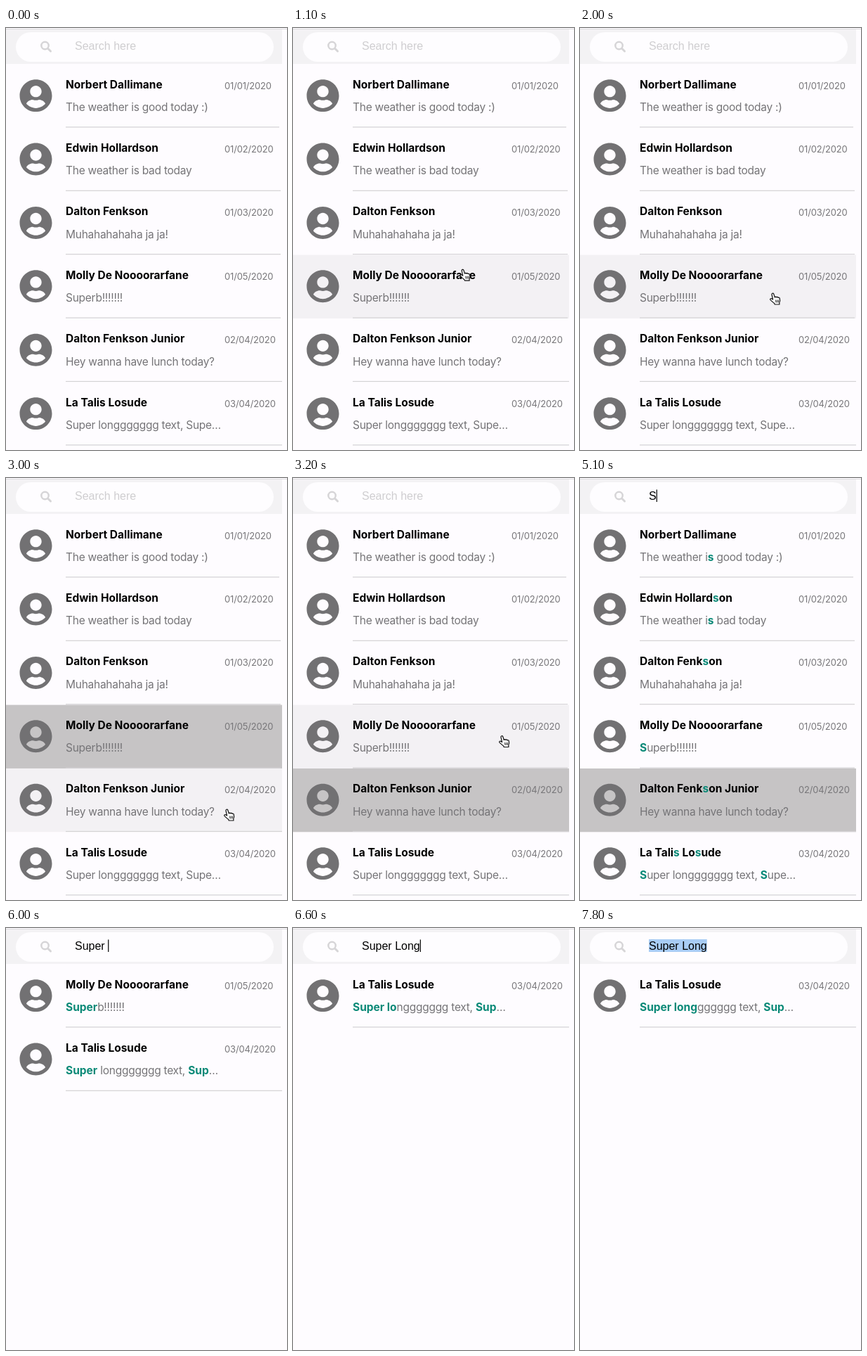
An HTML page that plays this animation: 400 px wide and 600 px high, repeating every 8000 ms.

```html
<!DOCTYPE html>
<html lang="en">
<head>
<meta charset="utf-8">
<title>Message search</title>
<style>
  html, body { margin: 0; width: 100%; height: 100%; overflow: hidden; background: #fefcff; }
  svg { display: block; width: 400px; height: 600px; }
  text { white-space: pre; font-family: Inter, Roboto, sans-serif; }
  .name { font-size: 15.5px; font-weight: 700; letter-spacing: 0; fill: #000; }
  .body { font-size: 15.5px; letter-spacing: -.26px; fill: #757477; }
  .date { font-size: 13px; letter-spacing: -.17px; fill: #78777a; }
  .hit { font-weight: 700; letter-spacing: 0; fill: #0a8977; }
  .input { font: 16px "Liberation Sans", Arial, sans-serif; fill: #000; }
  .hint { fill: #cfced0; }
</style>
</head>
<body>
<svg viewBox="0 0 400 600">
  <defs>
    <path id="avatar" fill="#727173" fill-rule="evenodd" d="M248 8C111 8 0 119 0 256s111 248 248 248 248-111 248-248S385 8 248 8zm0 96c48.600 0 88 39.400 88 88s-39.400 88-88 88-88-39.400-88-88 39.400-88 88-88zm0 344c-58.700 0-111.300-26.600-146.500-68.200 18.800-35.400 55.600-59.800 98.500-59.800 2.400 0 4.800.4 7.100 1.100 13 4.200 26.600 6.900 40.900 6.900 14.300 0 28-2.700 40.900-6.900 2.300-.7 4.700-1.100 7.100-1.100 42.900 0 79.700 24.400 98.500 59.800C359.300 421.400 306.700 448 248 448z"/>
  </defs>
  <rect width="400" height="600" fill="#fefcff"/>
  <rect y="1" width="393" height="50" fill="#f3f2f4"/>
  <rect y="1" width="400" height="1" fill="#dcdbdd"/>
  <rect x="14" y="6" width="367" height="42" rx="21" fill="#fefdff"/>
  <g fill="none" stroke="#d6d5d7" stroke-width="2.5">
    <circle cx="55.500" cy="25" r="5.200"/>
    <path d="M59.500 29l4 4" stroke-width="3" stroke-linecap="round"/>
  </g>
  <rect id="selection" x="98" y="16" height="18" fill="#a9cdf5"/>
  <text id="hint" class="input hint" x="98" y="31">Search here</text>
  <text id="input" class="input" x="98" y="31"></text>
  <rect id="caret" y="16.500" width="1.200" height="17.500" fill="#000"/>
  <g id="list"></g>
  <g id="hand" stroke="#111" stroke-linejoin="round" stroke-linecap="round">
    <path fill="#fff" stroke-width="1.200" d="M3 3C2.600 1.200 5 .4 5.700 2L7.300 7C7.600 6 9.200 5.900 9.600 7C10.200 6.100 11.700 6.300 12 7.500C12.800 6.800 14 7.300 14.300 8.500C14.800 10.500 15.200 12.500 13.800 14.500L13.900 17H7.200L6.800 15.600C5 14.400 3.200 12.400 1 10.600C0 9.400 1.600 8 3 8.900L4.600 10Z"/>
    <path fill="none" stroke-width=".9" d="M8.500 11l.5 3M10.500 11l.4 3M12.400 10.800l.3 3"/>
  </g>
  <g id="beam" fill="none">
    <path id="beamShape" d="M-3.500-8Q-1-8 0-6Q1-8 3.500-8M0-6V6M-3.500 8Q-1 8 0 6Q1 8 3.500 8M-2 2.500H2" stroke="#fff" stroke-width="2.600"/>
    <path d="M-3.500-8Q-1-8 0-6Q1-8 3.500-8M0-6V6M-3.500 8Q-1 8 0 6Q1 8 3.500 8M-2 2.500H2" stroke="#111" stroke-width="1.200"/>
  </g>
</svg>
<script>
const LOOP = 8000, TICK = 100, TOP = 51, PITCH = 90.4;
const $ = id => document.getElementById(id);

const rows = [
  ["Norbert Dallimane", "The weather is good today :)", "01/01/2020", 389],
  ["Edwin Hollardson", "The weather is bad today", "01/02/2020", 391],
  ["Dalton Fenkson", "Muhahahahaha ja ja!", "01/03/2020", 391],
  ["Molly De Noooorarfane", "Superb!!!!!!!", "01/05/2020", 391],
  ["Dalton Fenkson Junior", "Hey wanna have lunch today?", "02/04/2020", 393],
  ["La Talis Losude", "Super longgggggg text, Super longgggggg text", "03/04/2020", 393]
].map(([name, body, date, end], id) => ({ id, name, body, date, end }));

// Stepped tracks: [start time, value]
const typed = [[0, ""], [5000, "S"], [5200, "Su"], [5300, "Sup"], [5400, "Supe"], [5500, "Super"],
  [6000, "Super "], [6300, "Super L"], [6400, "Super Lo"], [6500, "Super Lon"], [6600, "Super Long"]];
const queries = [[0, ""], [5100, "s"], [5300, "su"], [5500, "sup"], [5600, "supe"], [5800, "super"],
  [6400, "super l"], [6600, "super lo"], [6700, "super lon"], [6800, "super long"]];
const selected = [[0, -1], [2300, 3], [3200, 4]];
const caretOn = [[0, false], [4400, true], [4800, false], [5000, true], [7100, false], [7600, true], [7800, false]];

// Pointer hotspot: [time, x, y]
const pointer = [[500, 201, 111], [600, 203, 111], [700, 203, 111], [1200, 252, 400], [1400, 267, 524],
  [1600, 265, 424], [1800, 261, 324], [2000, 275, 376], [2600, 275, 376], [2800, 305, 505],
  [2900, 331, 524], [3000, 315, 470], [3100, 315, 470], [3500, 247, 52], [3600, 247, 52],
  [3700, 250, 32], [3800, 256.5, 13], [4000, 256.5, 13], [4100, 259, 24], [4200, 259, 24], [4300, 285, 147]];

const valueAt = (track, t) => track.filter(k => k[0] <= t).pop()[1];

function pointerAt(t) {
  if (t < pointer[0][0] || t > pointer[pointer.length - 1][0]) return null;
  const i = pointer.findIndex(k => k[0] >= t);
  const [t1, x1, y1] = pointer[i], [t0, x0, y0] = pointer[Math.max(0, i - 1)];
  const u = t1 === t0 ? 1 : (t - t0) / (t1 - t0);
  return { x: x0 + (x1 - x0) * u, y: y0 + (y1 - y0) * u };
}

// Marks matches in the full string, then cuts it to the visible length.
function mark(str, query, limit = str.length) {
  const low = str.toLowerCase();
  let out = "", pos = 0;
  while (pos < limit) {
    const hit = query ? low.indexOf(query, pos) : -1;
    if (hit < 0 || hit >= limit) break;
    const end = Math.min(hit + query.length, limit);
    out += str.slice(pos, hit) + `<tspan class="hit">${str.slice(hit, end)}</tspan>`;
    pos = end;
  }
  return out + str.slice(pos, limit) + (limit < str.length ? "…" : "");
}

function rowMarkup(row, i, query, active, hovered) {
  const fill = row.id === active ? "#c6c4c5" : i === hovered ? "#f3f1f4" : "none";
  const limit = row.body.length > 30 ? (query.length > 2 ? 26 : 27) : row.body.length;
  return `<g transform="translate(0 ${TOP + i * PITCH})">
    <rect y=".4" width="393" height="90.3" fill="${fill}"/>
    <use href="#avatar" transform="translate(19.500 21.400) scale(.0927)"/>
    <text class="name" x="85" y="34.600">${mark(row.name, query)}</text>
    <text class="body" x="85" y="67.100">${mark(row.body, query, limit)}</text>
    <text class="date" x="311" y="35.700">${row.date}</text>
    <rect x="85" y="89.300" width="${row.end - 85}" height="1.200" fill="#d3d2d4"/>
  </g>`;
}

const show = (el, on) => el.setAttribute("visibility", on ? "visible" : "hidden");
const move = (el, x, y) => el.setAttribute("transform", `translate(${x} ${y})`);

function render(t) {
  const text = valueAt(typed, t), query = valueAt(queries, t), p = pointerAt(t);
  const overInput = p && p.y < 48;
  const hovered = p && !overInput ? Math.floor((p.y - TOP) / PITCH) : -1;

  const visible = rows.filter(r => (r.name + "\n" + r.body).toLowerCase().includes(query));
  $("list").innerHTML = visible.map((r, i) => rowMarkup(r, i, query, valueAt(selected, t), hovered)).join("");

  $("input").textContent = text;
  show($("hint"), !text);
  const width = text ? $("input").getComputedTextLength() : 0;
  $("caret").setAttribute("x", 98 + width);
  show($("caret"), valueAt(caretOn, t));
  $("selection").setAttribute("width", width);
  show($("selection"), t >= 7800);

  show($("hand"), p && !overInput);
  show($("beam"), overInput);
  if (p) {
    move($("hand"), p.x - 5, p.y);
    move($("beam"), p.x, p.y);
  }
}

let last = -1;
const start = performance.now();
function frame() {
  const t = Math.floor(((performance.now() - start) % LOOP) / TICK) * TICK;
  if (t !== last) render(last = t);
  requestAnimationFrame(frame);
}
frame();
</script>
</body>
</html>
```
